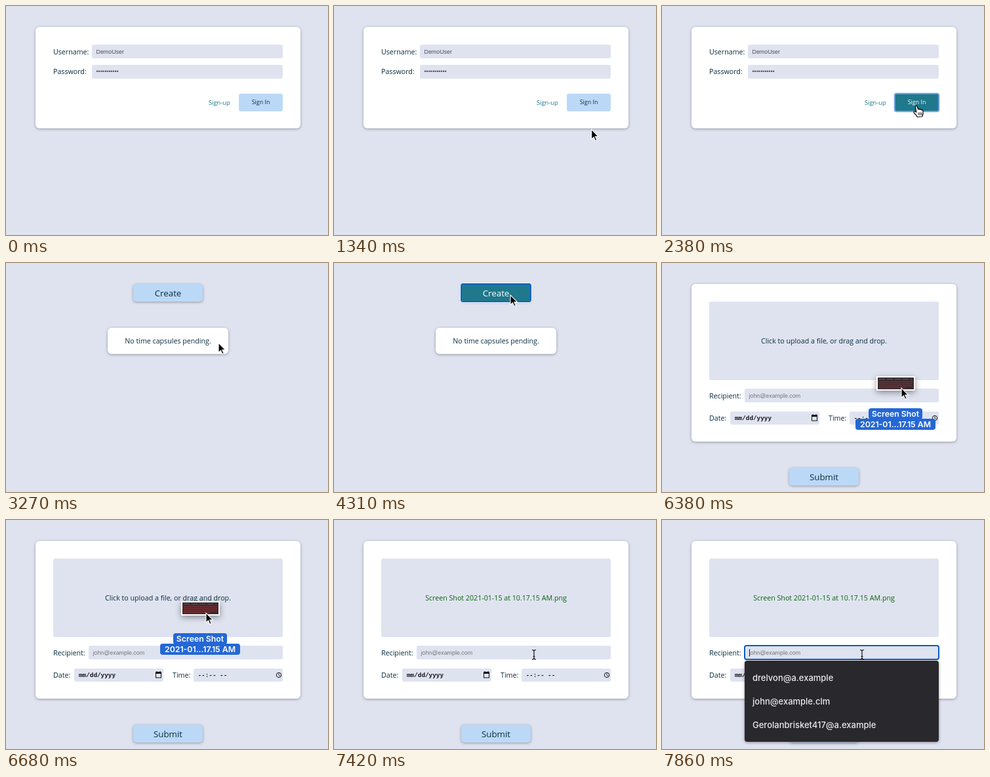
Animation of 491x350 px, one loop 8000 ms. Source, as an HTML page:

```html
<!DOCTYPE html>
<html lang="en">
<head>
<meta charset="utf-8">
<title>Time capsule demo</title>
<style>
  html, body { margin: 0; width: 100%; height: 100%; overflow: hidden; background: #dfe3f0; }
  svg { display: block; width: 100%; height: 100%; }
  text { font: 10.67px "Open Sans", sans-serif; fill: #0b2c3f; white-space: pre; }
  .card { fill: #fff; filter: drop-shadow(0 1px 2px #0005); }
  .field { fill: #dfe3f0; }
  .button rect { fill: #bbd9f7; }
  .raised rect { filter: drop-shadow(0 1px 2px #0005); }
  .button.hover rect { fill: #20788c; }
  .button.hover text { fill: #fff; }
  .mid { text-anchor: middle; }
  .big { font-size: 13.33px; }
  .small { font-size: 8.9px; }
  .link { font-size: 9.33px; fill: #20788c; }
  .input { font: 8.9px "Liberation Sans", sans-serif; fill: #4c4f58; }
  .hint { fill: #757575; }
  .mono { font: bold 9.33px "Liberation Mono", monospace; fill: #111; }
  .done { fill: #0a640a; }
  .tag { font: 600 12.3px Inter, sans-serif; fill: #fff; text-anchor: middle; }
  .option { font: 500 13px Inter, sans-serif; fill: #ececee; }
  .line { fill: none; stroke: #111; }
</style>
</head>
<body>
<svg viewBox="0 0 491 350">
  <g id="login">
    <rect class="card" x="45" y="32" width="404" height="155" rx="6"/>
    <text x="72" y="74">Username:</text>
    <rect class="field" x="131" y="59" width="291" height="21" rx="3"/>
    <text class="input" x="137.5" y="73">DemoUser</text>
    <text x="72" y="104">Password:</text>
    <rect class="field" x="131" y="90" width="291" height="21" rx="3"/>
    <text class="input" x="137.5" y="103.3">•••••••••••</text>
    <text class="link" x="309" y="151">Sign-up</text>
    <g class="button" id="signIn">
      <rect x="355" y="134" width="67" height="27" rx="3"/>
      <text class="mid small" x="388.5" y="150">Sign In</text>
    </g>
    <rect id="signInRing" x="354.7" y="133.7" width="67.6" height="27.6" rx="3" fill="none" stroke="#78a5e6" stroke-width="2"/>
  </g>

  <g id="home">
    <g class="button raised" id="create">
      <rect x="194" y="32" width="106" height="27" rx="5"/>
      <text class="mid big" x="247" y="51">Create</text>
    </g>
    <g id="createRing" fill="none">
      <rect x="192.5" y="30.5" width="109" height="30" rx="4" stroke="#fff"/>
      <rect x="194" y="32" width="106" height="27" rx="3" stroke="#0f62cf" stroke-width="2"/>
    </g>
    <rect class="card" x="155" y="99" width="184" height="40" rx="6"/>
    <text class="mid" x="247" y="123">No time capsules pending.</text>
  </g>

  <g id="form">
    <rect class="card" x="45" y="32" width="404" height="241" rx="6"/>
    <rect class="field" x="72" y="59" width="350" height="120" rx="3"/>
    <text class="mid" id="prompt" x="247" y="123">Click to upload a file, or drag and drop.</text>
    <text class="mid done" id="fileName" x="247" y="123">Screen Shot 2021-01-15 at 10.17.15 AM.png</text>
    <text x="72" y="207">Recipient:</text>
    <rect class="field" x="126" y="192" width="296" height="21" rx="3"/>
    <text class="input hint" x="132.5" y="206">john@example.com</text>
    <text x="72" y="241">Date:</text>
    <rect class="field" x="104" y="227" width="136" height="20" rx="3"/>
    <text class="mono" x="111" y="240">mm/dd/yyyy</text>
    <path d="M228 232h9v9.5h-9zM229 235v5.5h7v-5.5zM229.5 231h1v1h-1zM234.5 231h1v1h-1z" fill="#111" fill-rule="evenodd"/>
    <text x="254" y="241">Time:</text>
    <rect class="field" x="286" y="227" width="136" height="20" rx="3"/>
    <text class="mono" x="292.5" y="240">--:-- --</text>
    <circle class="line" cx="416" cy="237" r="3.7"/>
    <path class="line" d="M416 234.5v2.7l1.8 1.2" stroke-width=".9"/>
    <g class="button raised">
      <rect x="194" y="313" width="106" height="27" rx="5"/>
      <text class="mid big" x="247" y="332">Submit</text>
    </g>
    <g id="suggestions">
      <rect x="126" y="192" width="296" height="21" rx="3" fill="none" stroke="#0b5bc6" stroke-width="2"/>
      <path class="line" d="M133.5 197.5v11"/>
      <rect x="126" y="215" width="296" height="124" rx="4" fill="#29292d" style="filter:drop-shadow(0 1px 2px #0006)"/>
      <text class="option" x="138" y="246">drelvon@a.example</text>
      <text class="option" x="138" y="282">john@example.clm</text>
      <text class="option" x="138" y="318">Gerolanbrisket417@a.example</text>
    </g>
  </g>

  <g id="pointer">
    <g id="dragged">
      <rect x="-38" y="-18" width="59" height="22" fill="#fff" style="filter:drop-shadow(0 3px 5px #0006)"/>
      <rect x="-36" y="-16" width="55" height="18" fill="#392d31"/>
      <path d="M-34-9.5h51M-34-6.5h51M-34-3.5h51M-34-.5h40" stroke="#7a2c30" stroke-width="1.7"/>
      <path d="M-34-13.5h50" stroke="#5c5658" stroke-dasharray="9 3"/>
      <g fill="#2467d6">
        <rect x="-50" y="31" width="82" height="17" rx="4"/>
        <rect x="-70" y="47" width="122" height="17" rx="4"/>
      </g>
      <text class="tag" x="-9" y="44.3">Screen Shot</text>
      <text class="tag" x="-9" y="60">2021-01...17.15 AM</text>
    </g>
    <path id="arrow" d="M0 0V15L3.4 11.8 5.9 17.3 8.2 16.3 5.8 10.9H10.6Z" stroke="#fff" stroke-width="1.1"/>
    <g id="hand" stroke="#000" stroke-linecap="round" stroke-linejoin="round">
      <path fill="#fff" stroke-width="1.2" d="M-1.5 2Q-1-.3 1 1L2.6 6Q4 4.6 5.2 6.3 6.8 5.2 7.8 7 9.8 6.4 10 8.5 10.6 12 8.8 17L1.2 17.5Q0 14.5-4 11-4.8 8.6-2 9L-.2 10.4Z"/>
      <path d="M3.2 11v3.5M5.4 11v3.5M7.6 11v3.5" stroke-width=".9"/>
    </g>
    <path id="beam" class="line" d="M-3-7.5Q0-7.5 0-5.5V5Q0 7-3 7M3-7.5Q0-7.5 0-5.5M0 5Q0 7 3 7M-1.5 2.5h3" stroke-width="1.2"/>
  </g>
</svg>
<script>
const LOOP = 8000, STEPS = 54;
const el = id => document.getElementById(id);
const show = (id, on) => { el(id).style.display = on ? '' : 'none'; };
const smooth = p => p * p * (3 - 2 * p);
const easeOut = p => 1 - (1 - p) ** 2;
const linear = p => p;

// Each move runs along a quadratic curve: start, control, end.
const moves = [
  { at: 6, steps: 6, ease: easeOut, path: [[402, 390], [398, 210], [388, 152]] },
  { at: 19, steps: 6, ease: smooth, path: [[388, 154], [319.5, 142.5], [269, 49]] },
  { at: 31, steps: 3, ease: smooth, path: [[269, 49], [312, 118], [354, 183]] },
  { at: 43, steps: 2, ease: linear, path: [[365, 191], [335, 166.5], [305, 142]] },
  { at: 46, steps: 4, ease: smooth, path: [[303, 140], [302, 168], [305, 206]] }
];

function pointerAt(step) {
  const move = moves.findLast(m => m.at <= step) ?? moves[0];
  const p = move.ease(Math.min(1, Math.max(0, (step - move.at) / move.steps)));
  const [a, c, b] = move.path;
  return a.map((v, i) => (1 - p) ** 2 * v + 2 * p * (1 - p) * c[i] + p * p * b[i]);
}

function draw(now) {
  const step = Math.floor((now % LOOP) / LOOP * STEPS);
  const between = (from, to) => step >= from && step < to;
  const [x, y] = pointerAt(step);

  const login = step < 17, home = between(17, 30), form = step >= 30;
  show('login', login);
  show('home', home);
  show('form', form);

  const overSignIn = login && step >= 7 && y < 161;
  el('signIn').classList.toggle('hover', overSignIn);
  el('create').classList.toggle('hover', home && y < 59);
  show('signInRing', step === 16);
  show('createRing', step === 29);

  const dropped = step >= 47;
  show('prompt', !dropped);
  show('fileName', dropped);
  show('suggestions', step === 53);

  const overField = form && dropped && y > 192;
  show('pointer', between(7, 35) || step >= 43);
  show('dragged', between(43, 47));
  show('hand', overSignIn);
  show('beam', overField);
  show('arrow', !overSignIn && !overField);
  el('pointer').setAttribute('transform', `translate(${x} ${y})`);
}

const start = performance.now();
function tick() {
  draw(performance.now() - start);
  requestAnimationFrame(tick);
}
tick();
</script>
</body>
</html>
```
